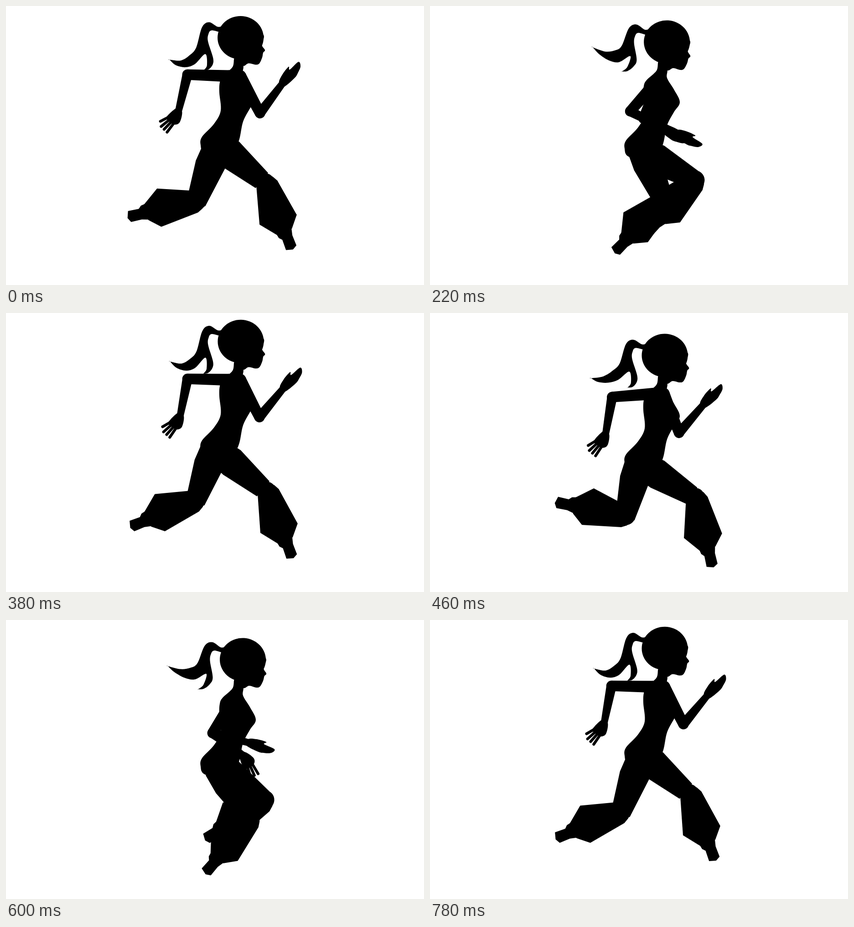
Write an HTML page with a canvas that moves like this. It is 917 by 611 pixels and loops after 800 ms.

```html
<!DOCTYPE html>
<html lang="en">
<head>
<meta charset="utf-8">
<title>Runner</title>
<style>
  html, body { margin: 0; width: 100%; height: 100%; overflow: hidden; background: #fff; }
  canvas { display: block; }
</style>
</head>
<body>
<canvas id="stage" width="917" height="611"></canvas>
<script>
const ctx = document.getElementById('stage').getContext('2d');
const LOOP = 800, STEP = 20, STRIDE = LOOP / 2;
const rad = Math.PI / 180;

// Body outlines, relative to the bobbing body.
const torso = [
  [502, 106], [497, 126], [475, 147], [469, 160], [468, 182], [471, 222],
  [456, 251], [430, 279], [427, 297], [435, 314], [475, 325], [502, 303],
  [512, 284], [520, 246], [535, 217], [548, 195], [535, 167], [520, 142], [520, 122]
];
const face = [
  [540, 40], [565, 56], [561, 77], [568, 89], [564, 95], [562, 105],
  [556, 118], [548, 121], [532, 118], [520, 124], [503, 114]
];
const hair = [
  [474, 38], [464, 38], [445, 28], [430, 40], [418, 83], [405, 99], [385, 111],
  [360, 112], [360, 112], [374, 122], [395, 126], [415, 120], [437, 98],
  [438, 122], [430, 133], [430, 133], [441, 131], [451, 120], [453, 105],
  [443, 70], [444, 54], [451, 46], [474, 50]
];

// Limb outlines, lying along x from their joint.
const thigh = [[0, -28], [40, -33], [132, -21], [132, 22], [45, 33], [0, 30]];
const bell = [[-8, -20], [4, -27], [89, -42], [114, -22], [117, 13], [82, 42], [2, 21]];
const foot = [[110, -22], [128, -18], [152, -19], [158, -9], [154, 6], [130, 6], [124, 12], [110, 15]];
const flatHand = [
  [-4, -7], [14, -13], [36, -14], [33, -8], [58, -5], [54, 5], [40, 10], [26, 12], [-4, 7]
];
const palm = [[-4, 7], [27, 10], [31, 0], [28, -14], [16, -19], [-4, -7]];

const wave = (t, peak, period = LOOP) => Math.cos(2 * Math.PI * (t - peak) / period);

// Sum of harmonics, each given as [amplitude, peak time].
const swing = (t, mean, ...parts) =>
  parts.reduce((sum, [amp, peak], i) => sum + amp * wave(t, peak, LOOP / (i + 1)), mean);

const thighAngle = t => swing(t, 60.7, [42, 380], [14.3, -7], [7, -20]);
const shinAngle = t => swing(t, 130, [54, 433], [18, 139], [6, -44]);
const upperArmAngle = t => swing(t, 122, [60, 0]);
const forearmAngle = t => swing(t, 25.5, [79, 17]);

function polygon(points) {
  ctx.beginPath();
  points.forEach(p => ctx.lineTo(p[0], p[1]));
  ctx.closePath();
  ctx.fill();
}

function blob(points) {
  const n = points.length, at = i => points[(i + n) % n];
  ctx.beginPath();
  ctx.moveTo(...at(0));
  for (let i = 0; i < n; i++) {
    const [a, b, c, d] = [at(i - 1), at(i), at(i + 1), at(i + 2)];
    ctx.bezierCurveTo(
      b[0] + (c[0] - a[0]) / 6, b[1] + (c[1] - a[1]) / 6,
      c[0] - (d[0] - b[0]) / 6, c[1] - (d[1] - b[1]) / 6, c[0], c[1]);
  }
  ctx.fill();
}

function oval(x, y, rx, ry = rx) {
  ctx.beginPath();
  ctx.ellipse(x, y, rx, ry, 0, 0, 2 * Math.PI);
  ctx.fill();
}

function placed(x, y, degrees, draw) {
  ctx.save();
  ctx.translate(x, y);
  ctx.rotate(degrees * rad);
  draw();
  ctx.restore();
}

// Draws a jointed limb: an upper part, then a lower part at its own absolute angle.
function limb(x, y, length, upper, lower, drawUpper, drawLower) {
  placed(x, y, upper, drawUpper);
  placed(x + length * Math.cos(upper * rad), y + length * Math.sin(upper * rad), lower, drawLower);
}

function taper(length, r0, r1) {
  oval(0, 0, r0);
  oval(length, 0, r1);
  polygon([[0, -r0], [length, -r1], [length, r1], [0, r0]]);
}

function drawLeg(x, y, t) {
  const length = swing(t, 133, [8, -20]);
  limb(x, y, length, thighAngle(t), shinAngle(t), () => {
    polygon(thigh);
    oval(length, 0, 21);
  }, () => {
    polygon(bell);
    polygon(foot);
  });
}

function drawHand(open) {
  if (!open) return blob(flatHand);
  blob(palm);
  ctx.lineWidth = 6;
  ctx.lineCap = 'round';
  ctx.beginPath();
  for (let i = 0; i < 4; i++) {
    ctx.moveTo(26, 7 - 6 * i);
    ctx.lineTo(51 - 7 * (i === 0), 13 - 9 * i);
  }
  ctx.stroke();
}

function drawArm(t) {
  const lower = forearmAngle(t), open = lower > 35;
  limb(swing(t, 502, [-12, 0]), 146, 92, upperArmAngle(t), lower,
    () => taper(92, 13, 11.5),
    () => {
      taper(82, 11, 7.5);
      placed(82, 0, open ? 30 : 4, () => drawHand(open));
    });
}

// The ponytail lags more the further it is from the head.
function ponytail(t) {
  return hair.map(([x, y]) => {
    const far = Math.max(0, (440 - x) / 80);
    const low = x > 425 ? Math.max(0, (y - 97) / 36) : 0;
    const dx = -far * (5 + 6 * wave(t, 140, STRIDE)) + low * (7 * wave(t, 30, STRIDE) - 2);
    const dy = low ? 0 : 15 * far * (wave(t, 114 * far - 72, STRIDE) - 0.9);
    return [x + dx, y + dy];
  });
}

function drawHead(t) {
  placed(495, 140, 1.9 * (1 - wave(t, 20, STRIDE)), () => {
    ctx.translate(-495, -140);
    blob(ponytail(t));
    oval(514.5, 62, 50.5, 47.5);
    blob(face);
  });
}

function draw(t) {
  ctx.fillStyle = '#fff';
  ctx.fillRect(0, 0, 917, 611);
  ctx.fillStyle = ctx.strokeStyle = '#000';
  placed(0, 15.5 + 26 * wave(t, 120, STRIDE), 0, () => {
    drawLeg(460, 290, t);
    drawLeg(463, 300, t + STRIDE);
    blob(torso);
    drawArm(t);
    drawArm(t + STRIDE);
    drawHead(t);
  });
}

const start = performance.now();
function tick() {
  const t = (performance.now() - start) % LOOP;
  draw(Math.floor(t / STEP) * STEP);
  requestAnimationFrame(tick);
}
tick();
</script>
</body>
</html>
```
